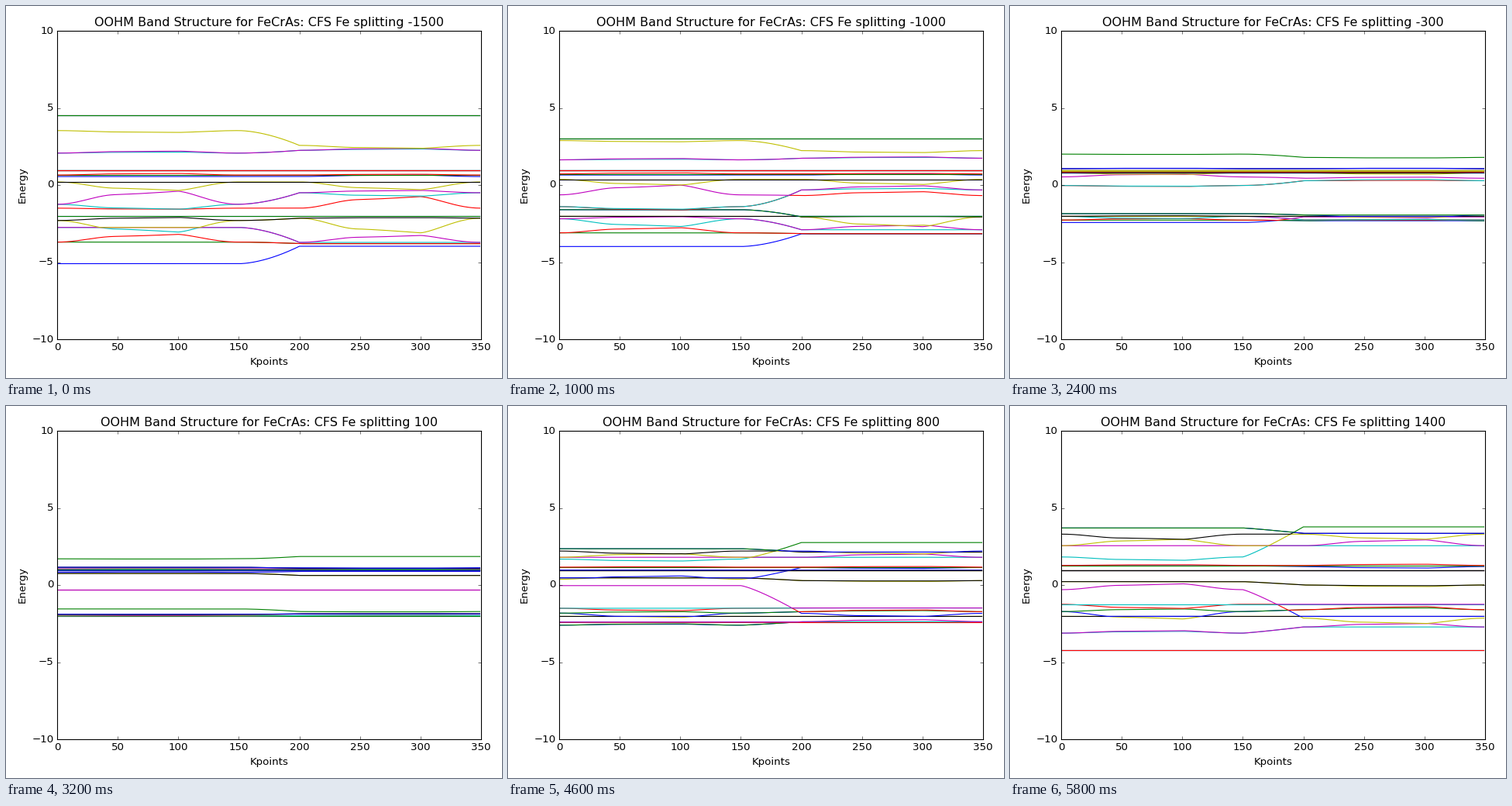
A matplotlib script that plays this animation: 640x480 px, repeating every 6000 ms.

```python
import numpy as np
import matplotlib.pyplot as plt
from matplotlib.animation import FuncAnimation

plt.style.use("classic")
plt.rcParams.update({"figure.facecolor": "white", "savefig.facecolor": "white",
                     "font.family": "DejaVu Sans"})

LEFT, BEND, MID, RIGHT = -1500, -1000, 100, 1400

# Dispersion along the in-plane loop: zero at both ends, largest at the corner
t = np.arange(50) / 50
wave = np.sin(np.pi * t / 2)
loop = np.concatenate([0.74 * wave ** 2, 0.74 + 0.26 * t ** 1.2, 1 - wave ** 1.4])


def level(s, e):
    """Energy at splitting s: three points bend smoothly, four stay straight."""
    if len(e) == 4:
        return np.interp(s, (LEFT, BEND, MID, RIGHT), e)
    d1, d2 = (e[1] - e[0]) / (MID - LEFT), (e[2] - e[1]) / (RIGHT - MID)
    m = (d1 * (RIGHT - MID) + d2 * (MID - LEFT)) / (RIGHT - LEFT)
    if s < MID:
        h, d, u = MID - LEFT, d1, (s - LEFT) / (MID - LEFT)
        return e[0] + d * h * u + h * (u ** 3 - u ** 2) * (m - d)
    h, d, u = RIGHT - MID, d2, (s - MID) / (RIGHT - MID)
    return e[1] + d * h * u + h * u * (1 - u) ** 2 * (m - d)


def width(s, w):
    """Band width, growing with |s|; a third value sets the bend."""
    if not w:
        return 0
    bend = w[2] if len(w) == 3 else w[0] * BEND / LEFT
    return np.interp(s, (LEFT, BEND, 0, RIGHT), (w[0], bend, 0, w[1]))


# Level: energy at Gamma, energy at A, then (lower, upper plane) widths per band
FLAT = ((), ())
outer = [
    ((-3.7, -1.9, -1.25), (-3.8, -1.87, -1.25), FLAT, ((.5, -.27), ())),
    ((-2.3, -1.95, -1.72), (-2.15, -1.87, -1.6),
     ((-.75, -.48), (-.95, .12)), ((.2, .17), (.04, .2))),
    ((-2.75, -1.6, -2.0, -3.12), (-3.72, -2.9, -1.98, -2.72),
     ((0, .12), ()), ((0, .16), (.45, .23))),
]
axial = [
    ((-5.1, -1.55, 1.25), (-3.97, -1.72, -2.15), ((), (0, -.35))),
    ((-1.5, .82, -.3), (-1.5, .88, 1.2), ((-.07, .38, .63), (.75, -.1, .25))),
]
mixed = ((-1.25, -1.4, .75, .22), (-.5, -.32, .62, 0),
         ((-.32, 0), (-.22, -.1, .27)), ((.85, 0, -.17), (.15, -.05)))
planar = ((.2, .37, 1.03, 1.27),) * 2 + (((-.55, 0), (-.5, 0)), ((0, .05), (0, .08)))
pair = ((.65, 1.05, 2.55),) * 2 + (FLAT, ((.1, .41), (.05, .38)))
lone = ((.55, 1.12, 3.3),) * 2 + (((0, -.34), (.1, -.33)),)
upper = ((2.07, 1.15, 3.7), (2.25, 1.08, 3.35),
         ((.07, 0), (.09, 0)), ((.13, 0), (.13, 0)))
top = ((3.53, 1.7, 1.82), (2.57, 1.85, 3.77), ((-.12, -.22), (-.19, 0)))

# Levels in the same set do not cross between the planes
SETS = [outer, axial] + [[x] for x in (mixed, planar, pair, lone, upper, top)]


def bands(s):
    """All 30 energies on the k path, sorted at every k point."""
    rows = []
    power = np.interp(s, (0, 1000), (1.7, 1.15))
    for levels in SETS:
        starts = [level(s, x[0]) for x in levels]
        ends = [level(s, x[1]) for x in levels]
        joins = zip(sorted(starts), sorted(ends))
        for (_, _, *members), g, a, (lo, hi) in zip(levels, starts, ends, joins):
            ramp = lo + (hi - lo) * t ** power
            for wg, wa in members:
                rows.append(np.concatenate([g + width(s, wg) * loop, ramp,
                                            a + width(s, wa) * loop]))
    for energy, count in ((0.97, 7), (-2.03, 2), (-0.003 * s, 3)):
        rows += [np.full(350, energy)] * count
    return np.sort(rows, axis=0)


fig = plt.figure(figsize=(8, 6), dpi=80)
ax = fig.add_axes([66 / 640, 50 / 480, 547 / 640, 398 / 480])
ax.set(xlim=(0, 350), ylim=(-10, 10), xlabel="Kpoints", ylabel="Energy",
       xticks=range(0, 351, 50), yticks=range(-10, 11, 5))
title = ax.set_title("")
k = np.arange(350)
lines = [ax.plot(k, 0 * k, color="bgrcmyk"[i % 7], lw=1)[0] for i in range(30)]


def update(i):
    s = LEFT + 100 * i
    for line, energy in zip(lines, bands(s)):
        line.set_ydata(energy)
    title.set_text(f"OOHM Band Structure for FeCrAs: CFS Fe splitting {s}")
    return lines + [title]


anim = FuncAnimation(fig, update, frames=30, interval=200,
                     repeat=True, repeat_delay=0, blit=False)
plt.show()
```
